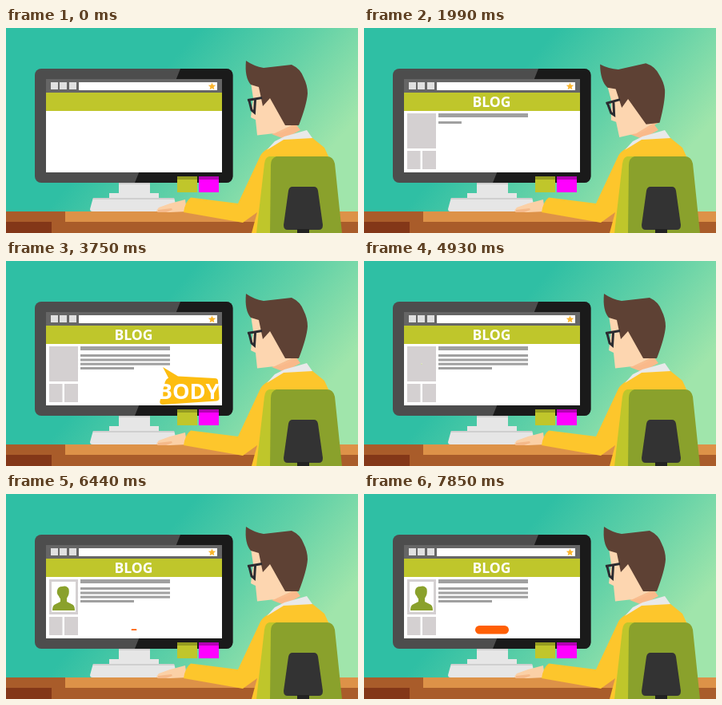
These frames come from a looping animation (440x257 px, 7880 ms). An HTML page:

```html
<!DOCTYPE html>
<html lang="en">
<head>
<meta charset="utf-8">
<title>Writing a blog post</title>
<style>
html, body { margin: 0; width: 100%; height: 100%; overflow: hidden; }
svg { display: block; width: 440px; height: 257px; }
text { font: 700 17.6px "Open Sans", sans-serif; fill: #fff; text-anchor: middle; }
</style>
</head>
<body>
<svg viewBox="0 0 440 257">
  <defs>
    <linearGradient id="wall" gradientUnits="userSpaceOnUse" x1="200" y1="50" x2="372" y2="193">
      <stop offset="0" stop-color="#2fbfa4"/>
      <stop offset=".5" stop-color="#62d1a7"/>
      <stop offset="1" stop-color="#a0e5ab"/>
    </linearGradient>
    <clipPath id="case"><rect x="36" y="51" width="247.500" height="143" rx="8"/></clipPath>
    <path id="balloon" fill="#fdbd10" d="M196 115L215 126.500L261 129Q264.500 129 265 132L266.500 154Q266.500 157 263 157.500L196 162Q192 162 192.300 158L199 133Q200 130 203 128.500Z"/>
  </defs>

  <rect width="440" height="257" fill="url(#wall)"/>

  <!-- desk -->
  <path fill="#dd9248" d="M74 230H440V243H74z"/>
  <path fill="#a95c2a" d="M0 230H74V243H0zM57 243H440V257H57z"/>
  <path fill="#833718" d="M0 243H57V257H0z"/>

  <!-- monitor -->
  <path fill="#e6e6e6" d="M141 193H180V207H191V213H207Q210 213 211 216L213 227Q213 230 210 230H108Q105 230 105 227L108 216Q109 213 112 213H129V207H141z"/>
  <path fill="#cfcfcf" d="M109 213H210L211 215H108zM141 194H180V196H141z"/>
  <g clip-path="url(#case)">
    <path fill="#4d4d4d" d="M36 51H284V194H36z"/>
    <path fill="#1a1a1a" d="M218 51H284V194H161z"/>
  </g>
  <path fill="#fff" d="M50 64H270V181H50z"/>
  <path fill="#666" d="M50 64H270V81H50z"/>
  <path fill="#e0e0e0" d="M56 68h9v9h-9zM67 68h9v9h-9zM79 68h9v9h-9z"/>
  <path fill="#fff" d="M91 68H264V78H91z"/>
  <path fill="#fbb52b" d="M257.500 68.500l1.300 3 3.400.3-2.600 2.200.8 3.200-2.900-1.800-2.900 1.800.8-3.200-2.600-2.200 3.400-.3z"/>
  <path fill="#bfc62b" d="M50 81H270V104H50z"/>
  <path fill="#c0c62b" d="M214 186H239V206H214z"/>
  <path fill="#959c20" d="M214 186H239V190H214z"/>
  <path fill="#f0f" d="M241 186H266V206H241z"/>
  <path fill="#b300b3" d="M241 186H266V190H241z"/>

  <!-- page -->
  <g id="blog">
    <text x="159.500" y="99">BLOG</text>
    <path fill="#d4d0d1" d="M54 107H90V151H54z"/>
  </g>
  <path id="thumbs" fill="#d4d0d1" d="M54 154H70.500V177H54zM73 154H90V177H73z"/>
  <g id="lines" fill="#a0a0a0"></g>
  <g id="avatar">
    <path fill="#fff" d="M57 110H87V148H57z"/>
    <g fill="#8aa12c">
      <path d="M64 121Q65 116 70 116Q76 114 78.500 119Q79.500 125 77 129Q75 133 72 133Q67 132 66 128Q63 125 64 121z"/>
      <path d="M58 146Q58 139 62 138L68 135V130H76V135L82 138Q86 139 86 146z"/>
    </g>
  </g>
  <rect id="button" x="139" y="165" width="42" height="10.500" rx="5.200" fill="#ff5f05"/>
  <g id="title"><use href="#balloon"/><text x="228" y="152">TITLE</text></g>
  <g id="body"><use href="#balloon" y="18"/><text x="228" y="170">BODY</text></g>
  <g id="cta">
    <path fill="#fdbd10" d="M179 168L187 157L185 140Q185 137 188 137L226 136Q229 136 229 139L227.500 158Q227 161 224 161H196z"/>
    <text x="207" y="154.500" style="font-size:16px">CTA</text>
  </g>

  <!-- writer -->
  <path fill="#fbd0a6" d="M188 229L191 225L205 220L224 215L226 230L205 231L190 231z"/>
  <path fill="#f5b98a" d="M190 228L207 226L208 228L200 231H190z"/>
  <path fill="#fdc62c" d="M346 138L382 137L398 150L404 163V200L330 230L320 257H307L314 231L296 244L222 231Q224 217 231 212.500L290 220L318 160Q320 156 326 152z"/>
  <path fill="#f9b98a" d="M332 133L362 120L368 128L348 139z"/>
  <path fill="#e9e9e9" d="M326 153L336 142L348 136L376 128L383 138L347 140z"/>
  <g id="head">
    <path fill="#fdd6b0" d="M306 68L320 60L352 90L362 120L336 132L314 134.500L312 115L306 112L309 88z"/>
    <path fill="#f9bd8f" d="M336 132L362 120L364 122L345 131z"/>
    <path fill="#5e4134" d="M300 41Q310 48 322 50L357 46Q368 51 372 62Q377 72 377 82Q376 96 366 122H349L330 88L321 98L316 74L306 71Q298 62 300 41z"/>
    <path fill="none" stroke="#2b2b30" stroke-width="3" d="M302 90.500L320 87.500M304 91L307 103L310.500 106L311.500 90"/>
  </g>

  <!-- chair -->
  <path fill="#bfc62b" d="M329 161H345V257H313L323 170Q324 162 329 161z"/>
  <path fill="#8aa12c" d="M338 161H401Q409 161 411 170L420 257H330L331 172Q331 163 338 161z"/>
  <path fill="#333" d="M358 199H385Q389 199 390 204L396 247Q396 253 391 253H352Q347 253 347 247L353 204Q354 199 358 199z"/>
  <path fill="#222" d="M364 252H379V257H364z"/>
</svg>
<script>
const LOOP = 7880;
const el = id => document.getElementById(id);
const clamp = v => Math.min(1, Math.max(0, v));
const part = (t, start, length) => clamp((t - start) / length);
const show = (node, on) => node.setAttribute('visibility', on ? 'visible' : 'hidden');
const scale = (node, x, y, s) =>
  node.setAttribute('transform', `translate(${x} ${y}) scale(${s}) translate(${-x} ${-y})`);

// Grows past full size, then settles.
function pop(p, peak = 1.55) {
  return p < .45
    ? peak * Math.sin(p / .45 * Math.PI / 2)
    : 1 + (peak - 1) * (1 + Math.cos((p - .45) / .55 * Math.PI)) / 2;
}

// y, height, width, start, duration
const lines = [
  [107, 5, 112, 240, 430],
  [117, 3, 112, 1880, 430],
  [122.5, 3, 112, 2310, 430],
  [127.7, 3, 112, 2740, 430],
  [133, 3, 67, 3170, 430]
].map(([y, height, width, start, length]) => {
  const node = document.createElementNS('http://www.w3.org/2000/svg', 'rect');
  for (const [k, v] of Object.entries({ x: 93, y, height })) node.setAttribute(k, v);
  el('lines').append(node);
  return { node, width, start, length };
});

const balloons = [
  { id: 'title', start: 450, end: 1900, tip: [196, 115], mid: [228, 146] },
  { id: 'body', start: 3510, end: 4930, tip: [196, 133], mid: [228, 164] },
  { id: 'cta', start: 6450, end: 7850, tip: [179, 168], mid: [207, 149], peak: 1.2 }
];

const nods = [[300, 970], [1600, 2210], [2710, 3510], [4330, 4930], [5570, 6440]];

function draw(t) {
  show(el('blog'), t >= 70);
  show(el('thumbs'), t >= 240);
  for (const l of lines) l.node.setAttribute('width', l.width * part(t, l.start, l.length));

  for (const b of balloons) {
    const node = el(b.id);
    show(node, t >= b.start && t < b.end);
    scale(node.firstElementChild, ...b.tip, Math.sin(part(t, b.start, 200) * Math.PI / 2));
    scale(node.querySelector('text'), ...b.mid, pop(part(t, b.start, 500), b.peak));
  }

  scale(el('avatar'), 72, 129, 1 - (1 - part(t, 4920, 650)) ** 3);
  scale(el('button'), 160, 170.2, pop(part(t, 6425, 520), 1.5));

  const down = nods.some(([from, to]) => t >= from && t < to);
  el('head').setAttribute('transform', `rotate(${down ? -6.3 : 0} 339 88)`);
}

function tick() {
  draw(performance.now() % LOOP);
  requestAnimationFrame(tick);
}
tick();
</script>
</body>
</html>
```
